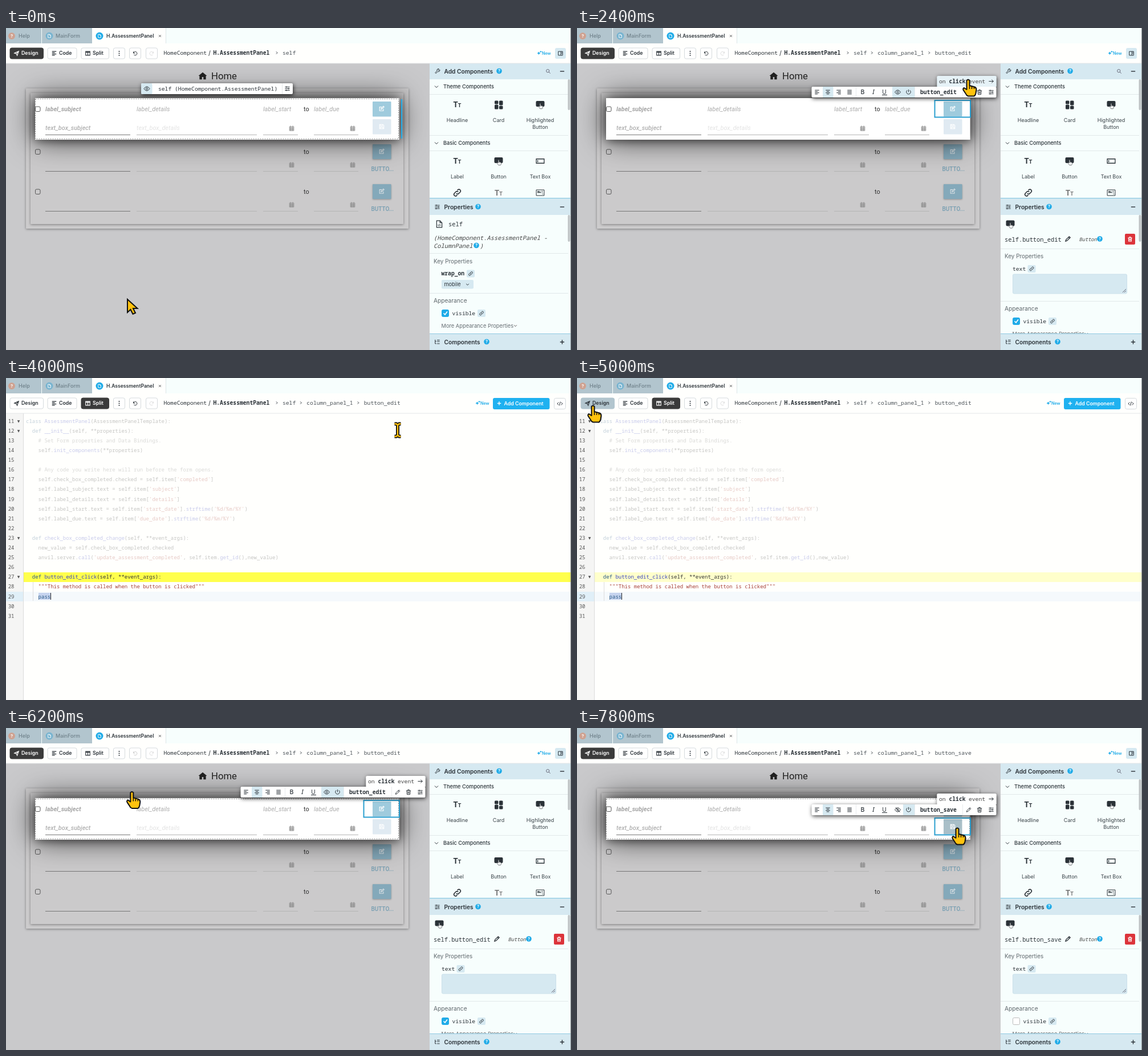
Animation, 991 px wide and 565 px high, one loop 8000 ms. Source, as an HTML page with a canvas:

```html
<!DOCTYPE html>
<html lang="en">
<head>
<meta charset="utf-8">
<title>App builder</title>
<style>
html, body { margin: 0; width: 100%; height: 100%; overflow: hidden; background: #fff; }
canvas { display: block; }
</style>
</head>
<body>
<canvas id="stage" width="991" height="565"></canvas>
<script>
const ctx = document.getElementById('stage').getContext('2d');
const LOOP = 8000;
const UI = 'Inter, sans-serif', MONO = '"Noto Sans Mono", monospace', FORM = 'Roboto, sans-serif';
const INK = '#2b3238', TINT = '#d6e9f1', BLUE = '#1fabe8', PANEL = '#f7fefd', GOLD = '#ffc20e', PAPER = '#fffffd';

const ICONS = {
  plane: 'M2 11 22 2 15 22 11 14zM11 14 22 2',
  left: 'M2 3h20M2 9h13M2 15h20M2 21h13',
  center: 'M2 3h20M6 9h12M2 15h20M6 21h12',
  right: 'M2 3h20M9 9h13M2 15h20M9 21h13',
  justify: 'M2 3h20M2 9h20M2 15h20M2 21h20',
  split: 'M2 3h20v18H2zM12 3v18M2 7h20',
  undo: 'M4 4v7h7M4 11a8.5 8.5 0 1 1 2 7',
  redo: 'M20 4v7h-7M20 11a8.5 8.5 0 1 0-2 7',
  eye: 'M1 12q11-16 22 0q-11 16-22 0zM8.5 12a3.5 3.5 0 1 0 7 0a3.5 3.5 0 1 0-7 0',
  slash: 'M3 2 21 22',
  power: 'M12 1v11M7 4a9 9 0 1 0 10 0',
  pencil: 'M3 21l2-6L17 3l4 4L9 19zM14 6l4 4',
  trash: 'M2 6h20M5 6l1 16h12l1-16M9 6V2h6v4M10 10v8M14 10v8',
  sliders: 'M2 5h20M2 12h20M2 19h20M8 2v6M17 9v6M7 16v6',
  wrench: 'M3 18 11 10a6 6 0 0 1 8-8l-4 4 3 3 4-4a6 6 0 0 1-8 8L6 21z',
  search: 'M3 10a7 7 0 1 0 14 0a7 7 0 1 0-14 0M15 15l7 7',
  chevron: 'M4 8l8 8 8-8',
  next: 'M8 4l8 8-8 8',
  arrow: 'M1 12h21M14 4l8 8-8 8',
  edit: 'M19 13v8H3V5h9M9 15l1-4L19 2l3 3-9 9z',
  save: 'M3 3h14l4 4v14H3zM7 3v6h8V3M7 21v-7h10v7',
  calendar: 'M3 5h18v17H3zM3 10h18M3 14h18M3 18h18M8 5v17M15.5 5v17M7 1v4M17 1v4',
  link: 'M9 14a5 5 0 0 0 7 1l5-5a5 5 0 0 0-7-7l-2 2M15 10a5 5 0 0 0-7-1l-5 5a5 5 0 0 0 7 7l2-2',
  doc: 'M4 2h10l6 6v14H4zM14 2v6h6',
  home: 'M12 2 0 12h3v10h7v-7h4v7h7V12h3z',
  tree: 'M3 2v17h5M3 9h5M11 4h11M11 10h11M11 19h11',
  sidebar: 'M2 3h20v18H2zM14 3v18M17 8h3M17 12h3',
  code: 'M7 6 1 12l6 6M17 6l6 6-6 6M14 4l-4 16',
  input: 'M1 6h22v12H1zM5 9v6',
  area: 'M1 4h22v16H1zM5 8h3v4H5zM10 8v4h3v-3M16 8h3M16 12h3M18 17l2-2',
  sparkle: 'M9 4q1 8 9 9q-8 1-9 9q-1-8-9-9q8-1 9-9zM18 0h3v3h3v3h-3v3h-3V6h-3V3h3z',
  close: 'M4 4l16 16M20 4 4 20',
  plus: 'M12 1v22M1 12h22',
  minus: 'M1 12h22'
};
const paths = Object.fromEntries(Object.entries(ICONS).map(([k, d]) => [k, new Path2D(d)]));
const HAND = new Path2D('M-2.5 1Q0-2 2.5 1V10l9 2.5q3 1 3 5l-1 6q-1 4-3 5H0q-3-1-4-4l-4-6q-2-3 1-4.5l4.5 3z');
const KNUCKLES = new Path2D('M2.5 10v6M6.5 11v5M10.5 12v4');
const POINTER = new Path2D('M0 0V23l5.5-5 4 8 4.5-2-4-8h7.5z');
const IBEAM = new Path2D('M-5.5-11h3l2.5 2 2.5-2h3M0-9V9M-5.5 11h3l2.5-2 2.5 2h3');

function text(s, x, y, size, color = INK, style = '', family = UI, align = 'left') {
  ctx.font = `${style} ${size}px ${family}`;
  ctx.textAlign = align;
  ctx.fillStyle = color;
  ctx.fillText(s, x, y + size * 0.36);
}
const mono = (s, x, y, size = 9.7, color = INK, style = '') => text(s, x, y, size, color, style, MONO);

function rect(x, y, w, h, fill, radius = 0, stroke) {
  ctx.beginPath();
  ctx.roundRect(x, y, w, h, radius);
  if (fill) { ctx.fillStyle = fill; ctx.fill(); }
  if (stroke) { ctx.strokeStyle = stroke; ctx.lineWidth = 1; ctx.stroke(); }
}
function disc(x, y, r, fill) {
  ctx.beginPath();
  ctx.arc(x, y, r, 0, 7);
  ctx.fillStyle = fill;
  ctx.fill();
}
function icon(name, x, y, size = 10, color = INK, weight = 1, filled) {
  const k = size / 24;
  ctx.save();
  ctx.translate(x - size / 2, y - size / 2);
  ctx.scale(k, k);
  ctx.lineWidth = weight / k;
  ctx.strokeStyle = ctx.fillStyle = color;
  filled ? ctx.fill(paths[name]) : ctx.stroke(paths[name]);
  ctx.restore();
}
function shadowed(color, blur, dx, dy, draw) {
  ctx.save();
  Object.assign(ctx, { shadowColor: color, shadowBlur: blur, shadowOffsetX: dx, shadowOffsetY: dy });
  draw();
  ctx.restore();
}
function clipped(x, y, w, h, draw) {
  ctx.save();
  ctx.beginPath();
  ctx.rect(x, y, w, h);
  ctx.clip();
  draw();
  ctx.restore();
}
function help(x, y, r = 4.8, fill = BLUE) {
  disc(x, y, r, fill);
  text('?', x, y, 7.5, '#fff', '700', UI, 'center');
}
function hand(x, y, scale, fill, line) {
  ctx.save();
  ctx.translate(x, y);
  ctx.scale(scale, scale);
  ctx.lineJoin = 'round';
  ctx.lineWidth = 2;
  ctx.fillStyle = fill;
  ctx.strokeStyle = line;
  ctx.fill(HAND);
  ctx.stroke(HAND);
  ctx.lineWidth = 1.5;
  ctx.stroke(KNUCKLES);
  ctx.restore();
}
function buttonIcon(x, y) {
  rect(x - 7.5, y - 6.5, 15, 10, INK, 2);
  hand(x, y - 2, 0.32, '#fff', INK);
}

// Cursor stops: time, x, y; "bow" bends the path that leads to the stop.
const STOPS = [
  { t: 200, x: 213, y: 476 }, { t: 1050, x: 667, y: 147 },
  { t: 1400, x: 667, y: 147 }, { t: 2200, x: 686, y: 91 },
  { t: 4000, x: 686, y: 91 }, { t: 4800, x: 28, y: 49 },
  { t: 5800, x: 28, y: 49 }, { t: 6900, x: 667, y: 176, bow: 119 }
];
function cursorAt(t) {
  const i = STOPS.findIndex(s => s.t > t);
  if (i === 0) return STOPS[0];
  if (i < 0) return STOPS[STOPS.length - 1];
  const a = STOPS[i - 1], b = STOPS[i], u = (t - a.t) / (b.t - a.t), e = u * u * (3 - 2 * u);
  return { x: a.x + (b.x - a.x) * e, y: a.y + (b.y - a.y) * e + (b.bow || 0) * e * (1 - e) };
}
function drawCursor(t, p) {
  const beam = t >= 2900 && t < 4600;
  if (!beam && t >= 950) return hand(p.x, p.y, 1, GOLD, '#111');
  ctx.save();
  ctx.translate(p.x, p.y);
  ctx.strokeStyle = '#111';
  ctx.lineWidth = beam ? 6 : 2;
  if (beam) {
    ctx.translate(1, .5);
    ctx.stroke(IBEAM);
    ctx.strokeStyle = GOLD;
    ctx.lineWidth = 2.4;
  } else {
    ctx.fillStyle = GOLD;
    ctx.fill(POINTER);
  }
  ctx.stroke(beam ? IBEAM : POINTER);
  ctx.restore();
}

function drawTabs() {
  rect(0, 0, 991, 27, PANEL);
  rect(0, 0, 62, 27, '#b2c5ce');
  rect(63, 0, 88, 27, '#b2c5ce');
  rect(151, 0, 130, 28, PAPER);
  rect(280, 0, 1, 27, '#dde5e8');
  help(10, 14, 6, '#cfa291');
  text('Help', 22, 14, 9, '#6f808a', '500');
  for (const [x, color] of [[76, '#78b4d0'], [164, BLUE]]) {
    disc(x, 14, 6.5, color);
    icon('doc', x, 14, 7, '#fff', 0.9);
  }
  text('MainForm', 87, 14, 9, '#6f808a', '500');
  text('H.AssessmentPanel', 176, 14, 8.6, INK, '600');
  icon('close', 270, 14, 6, '#777');
}

function toolButton(x, w, name, label, fill, color) {
  rect(x, 35, w, 19, fill, 3, fill === '#fff' ? '#d5dadd' : fill);
  icon(name, x + 11.5, 44.5, 9, color, 1.1);
  text(label, x + 20, 44, 8.8, color, '600');
}
function drawToolbar(t, design, crumb, cursor) {
  rect(0, 27, 991, 35, PAPER);
  const over = !design && cursor.x < 66 && cursor.y < 56;
  toolButton(7, 58.5, 'plane', 'Design', design ? '#3b3b3b' : over ? '#b2c5ce' : '#fff', design ? '#fff' : INK);
  toolButton(73, 51, 'left', 'Code', '#fff', INK);
  toolButton(132, 48.5, 'split', 'Split', design ? '#fff' : '#3b3b3b', design ? INK : '#fff');
  for (const x of [188, 216, 245]) rect(x + .5, 35, 20, 19, '#fff', 3, '#d5dadd');
  for (const d of [-3.5, 0, 3.5]) disc(198.5, 44.5 + d, 1, INK);
  icon('undo', 226.5, 44.5, 9, t >= 5800 && t < 6600 ? '#ccc' : INK);
  icon('redo', 255.5, 44.5, 9, '#ddd');
  mono('HomeComponent', 276.5, 44);
  text('/', 355, 44, 11);
  mono('H.AssessmentPanel', 363.5, 44, 9.7, INK, '700');
  let x = 485;
  for (const part of crumb) {
    icon('next', x - 10, 43.5, 6);
    mono(part, x, 44, 9.7, '#4a5157');
    x += part.length * 5.82 + 19;
  }
  const nx = design ? 931 : 823;
  icon('sparkle', nx + 4.5, 44, 8, BLUE, 1, true);
  text('New', nx + 9, 44.5, 7.2, BLUE, '600');
  if (design) {
    rect(963, 35, 19, 19, TINT, 3);
    icon('sidebar', 972.5, 44.5, 9);
  } else {
    rect(854, 35, 99.5, 20, '#1fb1f0', 3);
    icon('plus', 865, 44.5, 7, '#fff', 1.3);
    text('Add Component', 873.5, 45, 8.8, '#fff', '600');
    rect(961.5, 35.5, 20, 19, '#fff', 3, '#d5dadd');
    icon('code', 971.5, 45, 10);
  }
  rect(0, 61.5, 991, 1, '#e3e6e8');
}

function checkbox(y) { rect(51.5, y - 4, 8.5, 8.5, '#fff0', 2, '#555'); }
function fields(y) {
  [[69, 149, '#777'], [229, 211, '#b5b5b5'], [451, 61, '#b5b5b5'], [540, 78, '#b5b5b5']]
    .forEach(([x, w, c]) => rect(x, y, w, 1, c));
  icon('calendar', 501, y - 11, 10, '#8b8b8b', .9);
  icon('calendar', 608, y - 11, 10, '#8b8b8b', .9);
}
const form = (s, x, y, color, style) => text(s, x, y, 10.9, color, style, FORM);

function drawForm(t, cursor) {
  rect(0, 62, 743, 503, '#c9c9cb');
  icon('home', 345, 84, 15, '#222', 1, true);
  text('Home', 360, 84, 16.7, '#222', '', FORM);
  shadowed('rgba(0,0,0,.4)', 4, 0, 1, () => rect(35, 106, 671, 246, '#cccbcc', 1));
  shadowed('rgba(0,0,0,.4)', 4, 0, 1, () => rect(43, 114, 654, 230, '#cbcacb', 1));
  for (const y of [217, 287]) {
    checkbox(y);
    form('to', 522, y, '#333');
    fields(y + 34);
    shadowed('rgba(0,0,0,.3)', 3, 0, 1, () => rect(643, y - 13, 32.5, 26, '#84a9ba', 1));
    icon('edit', 659, y - .5, 10, '#d8dfe3', 1.1);
    text('BUTTO...', 640.5, y + 30, 10, '#769eb1', '500', FORM);
  }
  clipped(0, 62, 743, 503, () => {
    shadowed('rgba(0,0,0,.72)', 52, 0, 0, () => rect(51, 123, 638.5, 73, '#fff'));
    shadowed('rgba(0,0,0,.6)', 16, 0, 1, () => rect(51, 123, 638.5, 73, '#fff'));
  });
  if (t < 2300 || t >= 5800) {
    ctx.setLineDash([2, 2]);
    rect(51.5, 124.5, 637, 70, null, 0, '#888');
    ctx.setLineDash([]);
  }
  checkbox(142);
  form('label_subject', 69, 142, '#a6a6a6', 'italic 700');
  form('label_details', 229, 142, '#acacac', 'italic');
  form('label_start', 451, 142, '#acacac', 'italic');
  form('to', 522, 142, '#333');
  form('label_due', 540, 142, '#acacac', 'italic');
  form('text_box_subject', 69, 175, '#b0b0b0', 'italic 500');
  form('text_box_details', 229, 175, '#e4e4e4', 'italic');
  fields(187);
  const inside = y => cursor.x > 643 && cursor.x < 676 && cursor.y >= y && cursor.y < y + 26;
  rect(643, 129, 32.5, 26.5, inside(129) ? '#617a86' : '#9fcbdd', 1);
  icon('edit', 659, 141.5, 10, '#fff', 1.1);
  rect(643, 160, 32.5, 26.5, inside(160) ? '#a9bfc8' : '#e0eaf2', 1);
  icon('save', 659, 173, 10, '#fff', 1.1);
}

function popupBody(x, y, w, h, fill = '#fff') {
  shadowed('rgba(0,0,0,.75)', 7, 1, 2, () => rect(x, y, w, h, fill, 2));
}
function drawSelfPopup() {
  popupBody(237, 97, 266, 19);
  rect(237, 97, 19.5, 19, TINT, 2);
  icon('eye', 247, 106.5, 11);
  mono('self (HomeComponent.AssessmentPanel)', 267, 107);
  rect(484, 97, 1, 19, '#e3e6e8');
  icon('sliders', 493.5, 106.5, 10);
}
function drawButtonPopup(dx, dy, name, hovered) {
  const visible = name !== 'button_save';
  const tabFill = hovered ? '#e6f2f7' : '#fff';
  ctx.save();
  ctx.translate(dx, dy);
  popupBody(631.5, 84, 104, 20, tabFill);
  popupBody(411.5, 103, 324, 19);
  rect(631.5, 85, 104, 18, tabFill);
  mono('on', 635, 94, 9.7, '#444');
  mono('click', 652.5, 94, 9.7, INK, '600');
  mono('event', 687, 94, 9.7, '#444');
  icon('arrow', 726.5, 93.5, 9);
  rect(431, 103, 18.5, 19, TINT);
  rect(572, 103, 20, 19, TINT);
  if (visible) rect(553, 103, 19, 19, TINT);
  ['left', 'center', 'right', 'justify'].forEach((n, i) => icon(n, 421 + i * 19, 112.5, 9));
  text('B', 501, 112.5, 10.5, INK, '500', UI, 'center');
  text('I', 520, 112.5, 10.5, INK, 'italic', '"Noto Serif", serif', 'center');
  text('U', 539, 112, 10, INK, '', UI, 'center');
  rect(535, 117, 9, 1, INK);
  icon('eye', 562.5, 112.5, 11);
  if (!visible) icon('slash', 562.5, 112.5, 10);
  icon('power', 581.5, 112.5, 10);
  mono(name, 602, 112.5, 9.7, INK, '600');
  for (const x of [489, 592, 676]) rect(x, 103, 1, 19, '#e8ebed');
  icon('pencil', 687, 112.5, 10);
  icon('trash', 706, 112.5, 10);
  icon('sliders', 726.5, 112.5, 10);
  ctx.restore();
}

function panelHeader(y, name, label, helpX, sign) {
  rect(743, y, 247, 28, TINT);
  icon(name, 756.5, y + 14, 10);
  text(label, 768.5, y + 14, 10.2, INK, '600');
  help(helpX, y + 13.5);
  icon(sign, 975.5, y + 14, 8, INK, 1.4);
}
const rule = y => rect(743, y, 243, 1, '#e1e8ea');
function linkChip(x, y) {
  rect(x - 7, y - 6.5, 14, 13, TINT, 2);
  icon('link', x, y, 8);
}
function tile(x, y, draw, ...labels) {
  draw(x, y);
  labels.forEach((s, i) => text(s, x, y + 27.5 + i * 12, 9, '#3a4248', '', UI, 'center'));
}
function headline(x, y, color = INK) {
  text('T', x - 3, y, 13, color, '700', UI, 'center');
  text('T', x + 4, y + 1.5, 9, color, '700', UI, 'center');
}
function card(x, y) {
  for (const [dx, dy, h] of [[-7, -7, 6], [1, -7, 8], [-7, 0, 8], [1, 2, 6]]) {
    rect(x + dx, y + dy, 6.5, h, INK, 1.5);
  }
}
function section(y, label) {
  icon('chevron', 755, y, 9);
  text(label, 767, y, 9.2, INK, '500');
}

function drawAppearance(y, checked) {
  text('Appearance', 750, y, 10.2, '#5f676c');
  rect(764.5, y + 16, 12, 12, checked ? BLUE : '#fff', 2, checked ? BLUE : '#bbb');
  if (checked) {
    ctx.beginPath();
    ctx.moveTo(767.5, y + 22); ctx.lineTo(770, y + 24.5); ctx.lineTo(774, y + 19);
    ctx.strokeStyle = '#fff'; ctx.lineWidth = 1.6; ctx.stroke();
  }
  mono('visible', 782.5, y + 22);
  linkChip(834, y + 22);
  text('More Appearance Properties', 763.5, y + 44, 9.3, '#666d72');
  icon('chevron', 893.5, y + 44, 7, '#555');
}
function drawSidebar(selected) {
  rect(743, 62, 248, 503, PANEL);
  panelHeader(62, 'wrench', 'Add Components', 865, 'minus');
  icon('search', 951, 76, 9, '#667');
  section(103, 'Theme Components');
  rule(116);
  tile(791.5, 134.5, headline, 'Headline');
  tile(864, 134.5, card, 'Card');
  tile(937, 134.5, buttonIcon, 'Highlighted', 'Button');
  rule(188);
  section(202, 'Basic Components');
  rule(215);
  tile(791.5, 233.5, headline, 'Label');
  tile(864, 233.5, buttonIcon, 'Button');
  tile(937, 233.5, (x, y) => icon('input', x, y, 15, INK, 1.3), 'Text Box');
  clipped(743, 280, 243, 19, () => {
    icon('link', 791.5, 289, 14, INK, 1.6);
    headline(864, 289, '#777');
    icon('area', 937, 289, 15);
  });
  rect(743, 298, 247, 1.5, '#8fc9e2');
  panelHeader(300, 'sliders', 'Properties', 828, 'minus');
  clipped(743, 328, 247, 208, () => {
    if (selected === 'self') {
      icon('doc', 760, 344, 14, INK, 1.2);
      icon('code', 760, 346, 6, INK, .8);
      mono('self', 776, 344.5, 10.4);
      mono('(HomeComponent.AssessmentPanel -', 750, 368, 10.4, '#444', 'italic');
      mono('ColumnPanel', 750, 382, 10.4, '#444', 'italic');
      help(825, 381.5);
      mono(')', 831, 382, 10.4, '#444', 'italic');
      rule(395);
      text('Key Properties', 750, 409, 9.9, '#5f676c');
      mono('wrap_on', 763.5, 431, 9.7, INK, '600');
      linkChip(815, 431);
      rect(764, 442, 56, 15.5, TINT, 2);
      text('mobile', 768.5, 449.5, 9.2);
      icon('chevron', 809.5, 450, 7);
      rule(465);
      drawAppearance(478.5, true);
    } else {
      buttonIcon(760, 344);
      mono('self.' + selected, 750, 371, 10.4);
      icon('pencil', 861, 370, 11, INK, 1.3);
      mono('Button', 880.5, 370.5, 8.7, '#444', 'italic');
      help(917, 370);
      rect(961, 361, 18, 19, '#dc343b', 2);
      icon('trash', 970, 370.5, 9, '#fff', 1.2);
      rule(387);
      text('Key Properties', 750, 400.5, 9.9, '#5f676c');
      mono('text', 764, 423, 9.7);
      linkChip(797.5, 422.5);
      rect(764.5, 432, 200, 34, TINT, 2, '#cbe0ea');
      ctx.beginPath();
      ctx.moveTo(957, 464); ctx.lineTo(963, 458); ctx.moveTo(960, 464); ctx.lineTo(963, 461);
      ctx.strokeStyle = '#667'; ctx.stroke();
      rule(479);
      drawAppearance(492.5, selected === 'button_edit');
    }
  });
  rect(743, 536, 247, 1, '#8fc9e2');
  panelHeader(537, 'tree', 'Components', 843, 'plus');
  rect(985.5, 90, 4, 54, '#c0c4c6', 2);
  rect(985.5, 328, 4, 47, '#c0c4c6', 2);
}

const CODE = `class AssessmentPanel(AssessmentPanelTemplate):
  def __init__(self, **properties):
    # Set Form properties and Data Bindings.
    self.init_components(**properties)

    # Any code you write here will run before the form opens.
    self.check_box_completed.checked = self.item['completed']
    self.label_subject.text = self.item['subject']
    self.label_details.text = self.item['details']
    self.label_start.text = self.item['start_date'].strftime('%d/%m/%Y')
    self.label_due.text = self.item['due_date'].strftime('%d/%m/%Y')

  def check_box_completed_change(self, **event_args):
    new_value = self.check_box_completed.checked
    anvil.server.call('update_assessment_completed', self.item.get_id(),new_value)

  def button_edit_click(self, **event_args):
    """This method is called when the button is clicked"""
    pass

`.split('\n');
const TOKEN = /(#.*)|(""".*"""|'[^']*')|\b(class|def|pass)\b|(\w+)(?=\()|\s+|\w+|[^\w\s]/g;
const TOKEN_COLORS = ['#777', '#a8423a', '#2a5a86', '#3a44c0'];

function drawCode(t) {
  const lineY = n => 75.5 + (n - 11) * 17.1;
  const band = (n, x, w, fill) => rect(x, Math.round(lineY(n) - 8.6), w, 17, fill);
  rect(0, 62, 991, 503, PAPER);
  rect(0, 62, 30.5, 503, '#f5f5f4');
  rect(30, 62, 1, 503, '#dcdcdc');
  band(29, 0, 30, '#e0eff8');
  band(29, 31, 960, '#f5f9fc');
  const glow = Math.max(0, Math.min(1, (5400 - t) / 2000));
  band(27, 31, 960, `rgba(255,255,0,${glow})`);
  rect(47, 358, 1, 33, '#dcdcdc');
  rect(57, 377, 21.5, 12, '#c5d3ee');
  CODE.forEach((line, i) => {
    const n = 11 + i, y = lineY(n);
    text(n, 14.5, y, 9, '#555', '', MONO, 'right');
    if (/^\s*(class|def)/.test(line)) text('▼', 22, y, 6, '#555', '', '"DejaVu Sans", sans-serif', 'center');
    ctx.globalAlpha = n < 27 ? .28 : 1;
    for (const m of line.matchAll(TOKEN)) {
      const kind = [1, 2, 3, 4].findIndex(k => m[k]);
      mono(m[0], 35 + m.index * 5.4, y, 9, kind < 0 ? '#333' : TOKEN_COLORS[kind], kind === 2 ? '500' : '');
    }
    ctx.globalAlpha = 1;
  });
  rect(78, 377, 1, 12, '#222');
}

function draw(t) {
  const cursor = cursorAt(t);
  const design = t < 2900 || t >= 5800;
  const selected = t < 1200 ? 'self' : t < 7200 ? 'button_edit' : 'button_save';
  const hovered = t >= 2000 && t < 3700;
  if (design) {
    drawForm(t, cursor);
    if (selected === 'self') {
      rect(693, 125, 2, 69, BLUE);
      drawSelfPopup();
    } else {
      const shift = selected === 'button_save' ? 31 : 0;
      ctx.strokeStyle = '#2b9fd0';
      ctx.lineWidth = 2;
      ctx.strokeRect(627.5, 127 + shift, 62.5, 29.5);
      drawButtonPopup(0, shift, selected, hovered);
    }
    drawSidebar(selected);
  } else {
    drawCode(t);
    if (t < 3700) drawButtonPopup(-340, 10.5, selected, hovered);
  }
  drawTabs();
  drawToolbar(t, design, selected === 'self' ? ['self'] : ['self', 'column_panel_1', selected], cursor);
  rect(990, 0, 1, 565, '#8e9396');
  drawCursor(t, cursor);
}

const start = performance.now();
function frame() {
  draw((performance.now() - start) % LOOP);
  requestAnimationFrame(frame);
}
frame();
</script>
</body>
</html>
```
